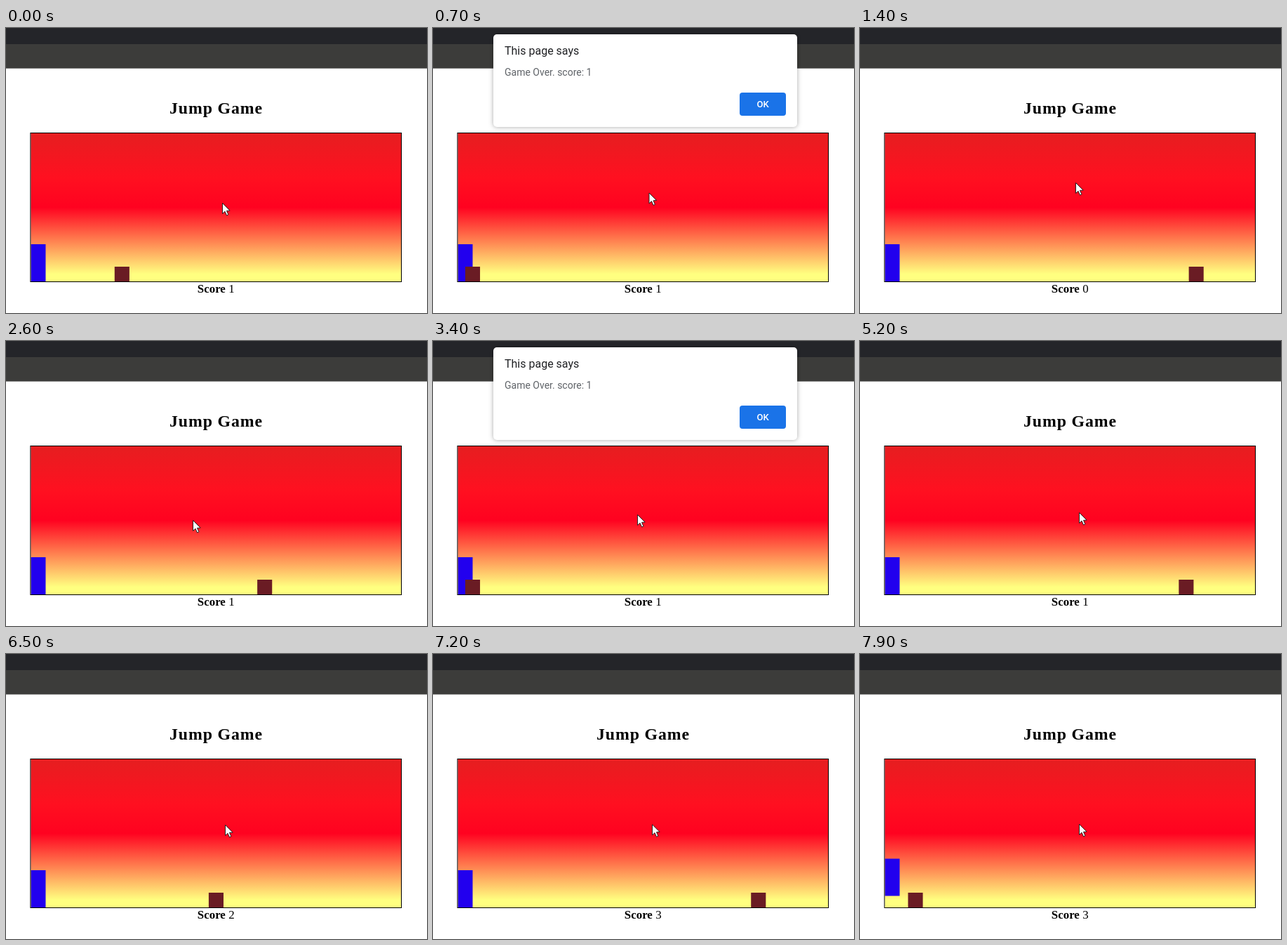
An HTML page with a canvas that plays this animation: 600x406 px, repeating every 8 s.

```html
<!DOCTYPE html>
<html lang="en">
<head>
<meta charset="utf-8">
<title>Jump Game</title>
<style>
  html, body { margin: 0; width: 100%; height: 100%; overflow: hidden; background: #fff; }
  canvas { display: block; }
</style>
</head>
<body>
<canvas id="stage" width="600" height="406"></canvas>
<script>
const ctx = document.getElementById('stage').getContext('2d');
const LOOP = 8000;
const SCALE = 1.056;
const SERIF = '"Liberation Serif", "Times New Roman", serif';
const SANS = 'Roboto, "Open Sans", sans-serif';

const game = { x: 35.4, y: 150, w: 527.6, h: 211 };
const ground = game.y + game.h;

// Timing of one lap of the block, in ms
const LAP = 999, HIT = 903, JUMP_AT = 834, JUMP = 300, POINT = 1020;

// Each round: its start and how many laps are cleared before a hit
const rounds = [
  { start: -1703, cleared: 1 },
  { start: 1267, cleared: 1 },
  { start: 4042, cleared: Infinity }
];
const pointer = [
  { t: 0, x: 308, y: 249 },
  { t: 1400, x: 307, y: 220 },
  { t: 2600, x: 266, y: 255 },
  { t: 4200, x: 316, y: 239 },
  { t: 5200, x: 312, y: 244 },
  { t: LOOP, x: 312, y: 242 }
];

const clamp = v => Math.max(0, Math.min(1, v));

function rect(x, y, w, h, color) {
  ctx.fillStyle = color;
  ctx.fillRect(x, y, w, h);
}

function roundRect(x, y, w, h, r, color) {
  ctx.fillStyle = color;
  ctx.beginPath();
  ctx.roundRect(x, y, w, h, r);
  ctx.fill();
}

function text(str, x, y, font, color = '#000', align = 'left') {
  ctx.font = font;
  ctx.fillStyle = color;
  ctx.textAlign = align;
  ctx.fillText(str, x, y);
}

function jumpHeight(age, cleared) {
  const since = age - JUMP_AT;
  const lap = Math.floor(since / LAP);
  if (lap < 0 || lap >= cleared) return 0;
  const p = (since - lap * LAP) / JUMP;
  return 50 * SCALE * clamp(Math.min(p, 1 - p) / 0.3);
}

function stateAt(t) {
  const round = rounds.findLast(r => r.start <= t);
  const age = Math.min(t - round.start, round.cleared * LAP + HIT);
  return {
    block: game.x + (480 - 520 * (age % LAP) / LAP) * SCALE,
    lift: jumpHeight(age, round.cleared),
    score: Math.floor(age / POINT)
  };
}

function pointerAt(t) {
  const next = Math.max(1, pointer.findIndex(p => p.t > t));
  const a = pointer[next - 1], b = pointer[next];
  const p = clamp((t - a.t) / (b.t - a.t));
  const e = p * p * (3 - 2 * p);
  return [a.x + (b.x - a.x) * e, a.y + (b.y - a.y) * e];
}

function drawGame({ block, lift }) {
  const sky = ctx.createLinearGradient(0, game.y, 0, ground);
  sky.addColorStop(0, '#e61e20');
  sky.addColorStop(0.3, '#ff1020');
  sky.addColorStop(0.5, '#ff0220');
  sky.addColorStop(0.95, '#ffff80');
  rect(game.x, game.y, game.w, game.h, sky);

  ctx.save();
  ctx.beginPath();
  ctx.rect(game.x, game.y, game.w, game.h);
  ctx.clip();
  rect(game.x, ground - 53 - lift, 21.1, 53, '#2200ee');
  rect(block, ground - 21, 21.1, 21, '#6a1c24');
  ctx.restore();

  ctx.strokeStyle = '#000';
  ctx.lineWidth = 1;
  ctx.strokeRect(34.9, 149.5, 528.6, 212);
}

function drawAlert(t) {
  for (let i = 1; i < rounds.length; i++) {
    const { start, cleared } = rounds[i - 1];
    const open = start + cleared * LAP + HIT;
    const close = rounds[i].start;
    const alpha = Math.min(clamp((t - open) / 100), clamp((close + 60 - t) / 100));
    if (!alpha) continue;
    ctx.save();
    ctx.globalAlpha = alpha;
    ctx.shadowColor = 'rgba(0,0,0,0.35)';
    ctx.shadowBlur = 6;
    roundRect(86, 9, 433, 132, 5, '#fff');
    ctx.shadowColor = 'transparent';
    text('This page says', 102, 38, '16px ' + SANS, '#202124');
    text('Game Over. score: 1', 102, 68, '14px ' + SANS, '#5f6368');
    roundRect(437, 92, 66, 33, 4, '#1a73e8');
    text('OK', 470, 113, '500 13px ' + SANS, '#fff', 'center');
    ctx.restore();
  }
}

function drawPointer(t) {
  const [x, y] = pointerAt(t);
  ctx.save();
  ctx.translate(x + 0.5, y + 0.5);
  const arrow = new Path2D('M0 0V15L3.5 11.8L6 17.5L8.4 16.4L6 10.9L10.6 10.6Z');
  ctx.fillStyle = '#fff';
  ctx.fill(arrow);
  ctx.strokeStyle = '#222';
  ctx.lineWidth = 1;
  ctx.stroke(arrow);
  ctx.restore();
}

function draw(t) {
  const state = stateAt(t);
  rect(0, 0, 600, 406, '#fff');
  rect(0, 0, 600, 23, '#242529');
  rect(0, 23, 600, 34.6, '#3c3c3a');
  ctx.letterSpacing = '0.9px';
  text('Jump Game', 299.5, 122, 'bold 23.8px ' + SERIF, '#000', 'center');
  ctx.letterSpacing = '0px';
  drawGame(state);
  text('Score', 272.8, 377, 'bold 16.9px ' + SERIF);
  text(state.score, 317.2, 377, '16.9px ' + SERIF);
  drawAlert(t);
  drawPointer(t);
}

const began = performance.now();
function tick() {
  draw((performance.now() - began) % LOOP);
  requestAnimationFrame(tick);
}
tick();
</script>
</body>
</html>
```
